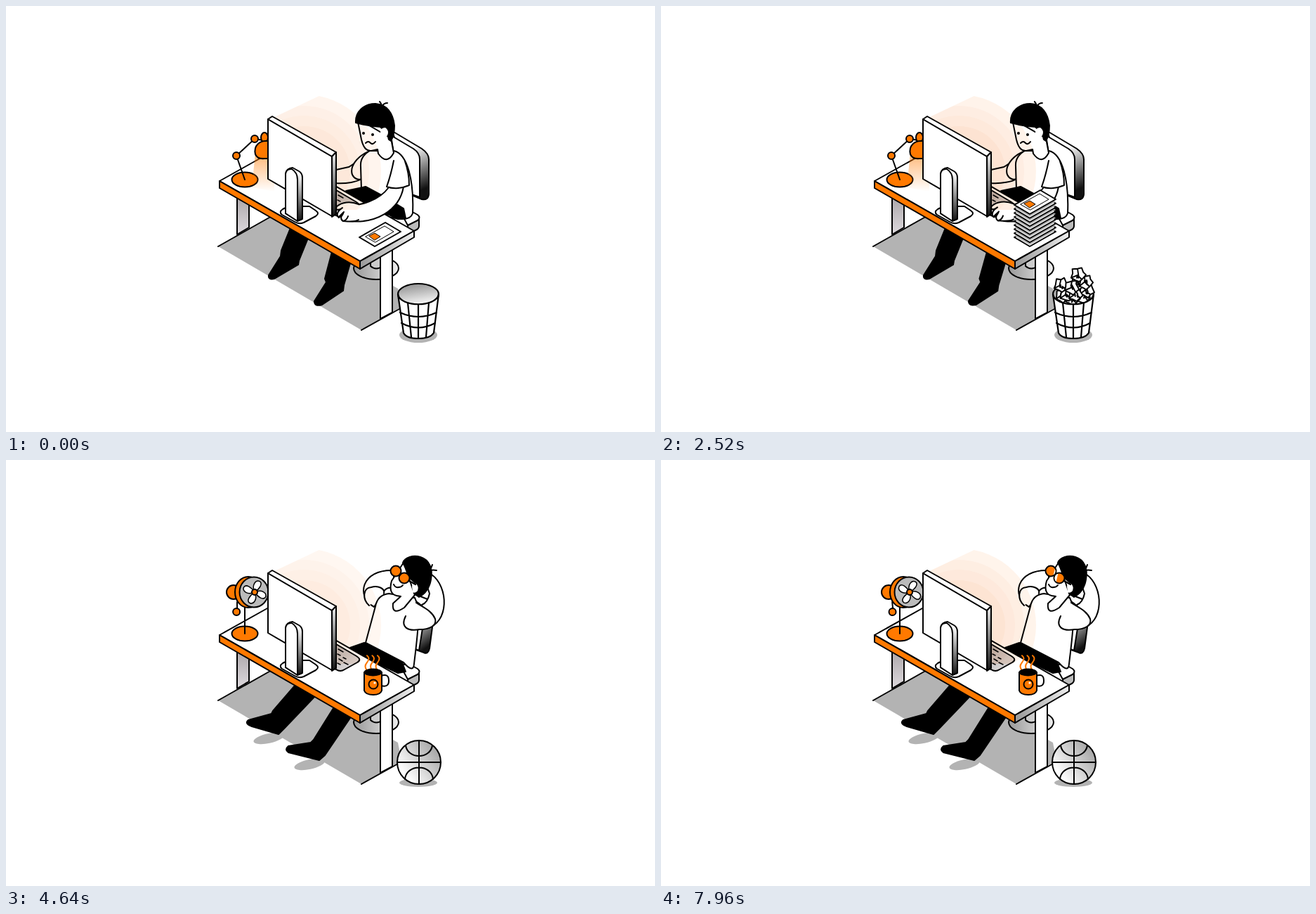
Recreate the animation shown at these times as an HTML page. Size 924 px wide and 606 px high, loop 8 s.

```html
<!DOCTYPE html>
<html lang="en">
<head>
<meta charset="utf-8">
<title>Desk</title>
<style>
  html, body { margin: 0; width: 100%; height: 100%; overflow: hidden; background: #fff; }
  svg { display: block; width: 100%; height: 100%; }
  .ink { stroke: #000; stroke-width: 2; stroke-linecap: round; stroke-linejoin: round; fill: #fff; }
  .line { fill: none; }
  .orange { fill: #ff7900; }
  .black { fill: #000; }
  .shade { fill: #b3b3b3; stroke: none; }
  .glow { mix-blend-mode: multiply; }
</style>
</head>
<body>
<svg viewBox="0 0 924 606" class="ink">
  <defs>
    <linearGradient id="down" x2="0" y2="1"><stop offset=".1" stop-color="#fff"/><stop offset="1" stop-color="#111"/></linearGradient>
    <linearGradient id="chair" x2=".25" y2="1"><stop offset=".35" stop-color="#fff"/><stop offset="1" stop-color="#111"/></linearGradient>
    <linearGradient id="side" x2="0" y2="1"><stop stop-color="#eee"/><stop offset=".35" stop-color="#999"/><stop offset="1" stop-color="#111"/></linearGradient>
    <linearGradient id="soft" x2="1" y2="0"><stop stop-color="#999"/><stop offset="1" stop-color="#eee"/></linearGradient>
    <linearGradient id="leg" x2="0" y2="1"><stop stop-color="#aaa5a8"/><stop offset="1" stop-color="#dedade"/></linearGradient>
    <linearGradient id="keys" x2="1" y2="1"><stop stop-color="#aaa"/><stop offset="1" stop-color="#e4dfdf"/></linearGradient>
    <linearGradient id="sphere" x1="1" y1=".1" x2=".15" y2=".75"><stop stop-color="#999"/><stop offset=".5" stop-color="#ccc"/><stop offset="1" stop-color="#fff"/></linearGradient>
    <linearGradient id="inside" x2=".3" y2="1"><stop stop-color="#888"/><stop offset="1" stop-color="#f2f2f2"/></linearGradient>
    <linearGradient id="beam" x2="0" y2="1"><stop stop-color="#ff7900" stop-opacity=".65"/><stop offset="1" stop-color="#ff7900" stop-opacity="0"/></linearGradient>
    <clipPath id="screenLight"><path d="M376 161L450 126H560V250L500 290H464L440 220Z"/></clipPath>
    <clipPath id="lenses"><circle cx="555" cy="158" r="6.6"/><circle cx="567" cy="168" r="6.6"/></clipPath>
  </defs>

  <path class="shade" d="M302 342L376 300L558 402L563 428L506 461Z"/>
  <g id="footShade" class="shade">
    <ellipse cx="374" cy="396" rx="22" ry="7" transform="rotate(-12 374 396)"/>
    <ellipse cx="432" cy="433" rx="22" ry="7" transform="rotate(-12 432 433)"/>
  </g>

  <ellipse cx="527" cy="373" rx="32" ry="16" fill="url(#soft)"/>
  <path d="M519 360V370Q527 377 536 370V358" fill="#ccc"/>
  <path d="M572 309L588 300V313Q588 317 583 319L572 324Z" fill="#bbb"/>
  <path d="M560 290L577 292L586 297Q591 301 586 305L572 312Z"/>
  <path id="chairSide" fill="url(#chair)"/>
  <path id="chairBack"/>

  <g id="farArm"><path id="farFore"/><path id="farSleeve"/></g>
  <path id="torso"/>
  <path id="thighs" class="black"/>
  <path id="leftLeg" class="black"/>
  <path id="rightLeg" class="black"/>

  <path d="M329 270V325L346 315V280Z" fill="url(#leg)"/>
  <path class="line" d="M302 342L380 298M506 461L560 431"/>
  <path d="M533 350V445L550 436V342Z"/>
  <path d="M304 249L381 206L581 320L504 363Z"/>
  <path class="orange" d="M304 249L504 363V374L304 259Z"/>
  <path d="M504 363L581 320V329L504 374Z" fill="url(#soft)"/>
  <path d="M460 256L499 279Q507 284 500 288L482 298Q476 302 470 298L450 287Z" fill="url(#keys)"/>
  <path class="line" d="M472 276L476 278M474 283L479 286M472 289L476 291M480 281L484 283M481 288L487 291M473 269L480 273" stroke-width="1.5"/>

  <ellipse class="orange" cx="340" cy="247" rx="18.5" ry="10.5"/>
  <g id="lamp">
    <path id="cone" d="M355 209L350 258L382 264V210Z" fill="url(#beam)" stroke="none"/>
    <path class="line" d="M340 247L328 213L354 189L366 191"/>
    <g class="orange">
      <circle cx="328" cy="213" r="5"/><circle cx="354" cy="189" r="5"/>
      <ellipse cx="368" cy="187" rx="5" ry="7"/>
      <path d="M355 211C352 198 362 191 372 192H382V217H368Q358 218 355 211Z"/>
    </g>
  </g>
  <g id="fan">
    <path class="line" d="M340 247V208"/>
    <g id="cord"><path class="line" d="M329 202V216"/><circle class="orange" cx="328" cy="216" r="5"/></g>
    <circle class="orange" cx="324" cy="188" r="10"/>
    <ellipse class="orange" cx="345" cy="188" rx="19" ry="22"/>
    <ellipse cx="353" cy="188" rx="20.5" ry="21.5" fill="#bbb"/>
    <g id="blades"></g>
    <circle class="orange" cx="354" cy="188" r="4"/>
  </g>

  <path id="nearFore"/>
  <path id="nearSleeve"/>
  <g id="head">
    <path id="face"/>
    <path id="hair" class="black"/>
    <path id="ear" stroke="none"/>
    <path id="tuft" class="line"/>
    <path id="eyes" class="line" stroke-width="4"/>
    <path id="mouth" class="line"/>
    <g id="glasses">
      <path class="line" d="M572 171L583 177" stroke-width="2.4"/>
      <circle class="orange" cx="555" cy="158" r="7.5"/><circle class="orange" cx="567" cy="168" r="7.5"/>
      <g clip-path="url(#lenses)"><path id="glint" d="M4 -20L-8 30" stroke="#fff" stroke-width="6"/></g>
    </g>
  </g>
  <g id="hand">
    <path d="M502 282C490 277 478 279 471 285C468 291 474 291 479 287C471 292 470 298 474 301C472 301 477 297 481 293C476 299 476 304 480 306C484 306 496 308 502 304"/>
    <path class="line" d="M474 300Q478 300 480 295M480 306Q485 305 487 299"/>
  </g>

  <g id="light" class="glow" clip-path="url(#screenLight)" stroke="none"></g>

  <path d="M394 289L402 285H432L441 291Q447 295 441 299L424 308Q417 311 411 307L393 297Q388 293 394 289Z"/>
  <path d="M373 161L464 214V299L373 246Z"/>
  <path d="M373 161L379 157L470 208L464 214Z"/>
  <path d="M464 214L470 208V296L464 300Z" fill="url(#side)"/>
  <path d="M398 295V239Q399 231 408 230L417 235Q422 238 422 244V303L415 306Z" fill="url(#down)"/>
  <path d="M398 295V239Q399 231 407 232Q415 237 415 247V306Z"/>

  <g id="stack"></g>
  <g id="mug">
    <path class="line" id="steam" style="stroke:#ff7900"/>
    <path d="M534 307Q545 303 545 314Q545 324 534 321Z"/>
    <path class="orange" d="M510 302V328Q512 334 523 334Q533 334 535 328V302Z"/>
    <ellipse class="black" cx="522.5" cy="302" rx="12" ry="4.5"/>
    <circle class="orange" cx="523" cy="319" r="6.5"/><circle cx="525" cy="317" r="1.6" stroke="none"/>
  </g>

  <g id="bin" stroke-width="2.2">
    <ellipse id="binShade" class="shade" cx="587" cy="468" rx="27" ry="11"/>
    <ellipse cx="587" cy="410" rx="29" ry="15" fill="url(#inside)"/>
    <g id="balls" stroke-width="1.9"></g>
    <path d="M558 410L566 465Q570 473 587 473Q604 473 609 465L616 410C613 429 561 429 558 410Z"/>
    <path class="line" d="M572 422L577 471M587 425V473M602 422L598 471M561 436Q587 448 613 436M563 451Q587 464 611 451"/>
  </g>
  <g id="ball">
    <ellipse class="shade" cx="587" cy="459" rx="27" ry="6"/>
    <circle cx="588" cy="430" r="31" fill="url(#sphere)"/>
    <path class="line" d="M588 399V461M557 430H619M569 406C572 426 604 426 607 406M568 454C570 432 606 432 608 454"/>
  </g>
</svg>
<script>
const NS = 'http://www.w3.org/2000/svg';
const $ = id => document.getElementById(id);
const add = (parent, tag, attrs) => {
  const node = parent.appendChild(document.createElementNS(NS, tag));
  for (const k in attrs) node.setAttribute(k, attrs[k]);
  return node;
};
const move = (el, value) => el.setAttribute('transform', value);
const clamp = v => Math.max(0, Math.min(1, v));
const span = (t, a, b) => clamp((t - a) / (b - a));
const ease = k => k * k * (3 - 2 * k);
const back = k => k <= 0 ? 0 : 1 + 2.4 * (k - 1) ** 3 + 1.4 * (k - 1) ** 2;
const lerp = (a, b, k) => a + (b - a) * k;
const wave = (t, period) => Math.sin(t / period * 2 * Math.PI);

// Path poses: typing, hands on face, relaxed (the last defaults to the second).
const poses = {
  chairSide: ['M550 178L592 203Q602 210 602 218L602 268Q601 277 592 275L580 270Z',
    'M580 190L600 198Q612 204 610 215L603 268Q601 277 595 274L584 270Z'],
  chairBack: ['M548 184L580 203Q589 209 589 218L589 272L560 262Z',
    'M575 195L588 204Q597 211 596 221L588 271L565 262Z'],
  farFore: ['M514 214C502 218 494 226 488 229L470 233L470 252C485 253 500 250 506 246Z',
    'M520 215C490 201 494 157 546 160L546 180L542 184C534 182 530 192 525 204Z',
    'M524 209C498 195 505 155 552 157L552 176L549 182C540 180 535 190 530 200Z'],
  farSleeve: ['M516 207C500 214 489 228 493 240C496 246 502 248 506 246',
    'M511 211C501 201 504 187 515 184C525 182 534 185 534 191',
    'M517 207C507 198 508 182 520 181C530 178 540 183 538 190'],
  torso: ['M518 206Q504 214 505 228L506 262L545 300Q575 308 579 295C581 250 572 210 552 206Z',
    'M541 190Q526 192 523 208L511 260L566 288Q580 304 581 290C584 262 588 215 574 196Z',
    'M545 190Q529 192 526 208L512 260L566 288Q580 304 581 290C584 262 592 215 582 196Z'],
  thighs: ['M484 263L512 257L540 272L566 288L569 302L558 303L520 285Z',
    'M490 267L510 260L540 275L564 288L569 301L558 303L520 285Z'],
  leftLeg: ['M405 316L392 348L391 356L374 383Q373 390 382 388L416 368L417 362L430 330Z',
    'M412 320L381 358L378 363L348 372Q342 378 352 380L390 388L399 380L440 336Z',
    'M412 320L380 357L378 361L345 370Q339 375 350 379L388 390L396 382L440 336Z'],
  rightLeg: ['M464 350L454 388L456 393L439 420Q439 428 450 425L480 405L481 397L490 366Z',
    'M468 350L441 399L436 403L405 411Q400 417 408 420L448 425L458 417L492 364Z',
    'M468 350L438 398L434 402L402 407Q396 412 402 416L446 427L454 420L492 364Z'],
  nearFore: ['M545 258C530 278 505 283 490 284L476 290L488 306C525 310 560 292 566 257Z',
    'M590 230C582 222 574 210 562 204L556 188L572 180C590 190 632 220 600 239Z',
    'M592 206C600 203 602 195 603 190L598 175L606 163C630 180 632 232 598 240Z'],
  nearSleeve: ['M552 220C549 235 546 246 542 257C552 261 565 259 574 255C574 245 572 232 568 221',
    'M568 222C560 240 575 246 590 243C604 241 614 236 611 226C606 216 595 211 584 204',
    'M569 222C561 238 572 244 589 241C602 241 614 236 611 226C606 214 594 210 584 203'],
  face: ['M500 160L506 190Q510 207 520 206L529 204L530 210Q542 227 552 209L548 188Z',
    'M566 146L549 172Q544 190 556 193L562 194L551 204Q549 222 567 210L582 192Z'],
  hair: ['M498 166C497 150 510 139 526 139C542 140 551 152 553 170C553 180 551 187 548 192L545 190L543 182L533 172C520 171 508 169 498 166Z',
    'M565 146C568 138 580 135 590 138C603 142 608 155 605 170C603 182 597 190 588 195L581 190L586 178L576 169C573 160 568 152 565 146Z'],
  ear: ['M533 180Q533 173 540 173Q546 177 543 184Q540 189 535 186',
    'M578 180Q579 174 584 176Q588 180 586 186Q583 190 579 188'],
  tuft: ['M535 142Q534 138 532 136M536 142Q538 138 543 138',
    'M603 157Q606 153 607 149M604 157Q608 156 613 157'],
  eyes: ['M509 181L509 181M522 183L522 183', 'M558 164L558 164M569 171L569 171'],
  mouth: ['M512 195Q516 191 519 195Q522 198 526 193', 'M552 177Q554 182 559 181Q563 181 565 178']
};
const mix = (a, b, k) => {
  const target = b.match(/-?[\d.]+/g);
  let i = 0;
  return a.replace(/-?[\d.]+/g, n => lerp(+n, +target[i++], k).toFixed(2));
};

let seed = 11;
const random = () => (seed = seed * 16807 % 2147483647) / 2147483647;

for (const [rx, ry, fill] of [[110, 109, '#fff2e8'], [93, 93, '#feebde'], [80, 79, '#fee6d6'], [66, 64, '#fde0cc']])
  add($('light'), 'ellipse', { cx: 424, cy: 235, rx, ry, fill });

for (let i = 0; i < 4; i++)
  add($('blades'), 'path', { d: 'M0 0C-8 -8 -5 -17 1 -17C7 -16 5 -7 0 0Z', transform: `rotate(${i * 90})`, 'stroke-width': 1.5 });

const sheets = Array.from({ length: 12 }, (_, i) => {
  const sheet = add($('stack'), 'g', { transform: `translate(0 ${-5.75 * i})` });
  const outline = 'M503 329L540 308L562 321L525 342Z';
  if (i) add(sheet, 'path', { d: outline, class: 'shade', transform: 'translate(0 3.5)' });
  add(sheet, 'path', { d: outline });
  add(sheet, 'path', { d: 'M512 328L539 313L552 321L526 336Z', 'stroke-width': 1 });
  add(sheet, 'path', { d: 'M517 327L525 323L533 328L525 333Z', class: 'orange', 'stroke-width': 1 });
  return sheet;
});

const spots = [[572, 412], [601, 413], [586, 416], [606, 404], [578, 410], [590, 410],
  [594, 394], [570, 397], [585, 400], [605, 393], [594, 382], [580, 374]];
const balls = spots.map(([x, y]) => {
  const ring = Array.from({ length: 10 }, (_, i) => {
    const a = (i + random() * .5) / 10 * 2 * Math.PI, r = (i % 2 ? 7.5 : 10) + random() * 1.5;
    return [x + r * Math.cos(a), y + r * Math.sin(a)].map(v => v.toFixed(1)).join(' ');
  });
  const creases = [1, 4, 7].map(i => `M${ring[i]}L${x + random() * 6 - 3} ${y + random() * 6 - 3}l${random() * 5 - 2} 3`);
  return add($('balls'), 'path', { d: `M${ring.join('L')}Z${creases.join('')}` });
});

function pop(id, k, x, y) {
  $(id).style.display = k > 0 ? '' : 'none';
  move($(id), `translate(${x} ${y}) scale(${k}) translate(${-x} ${-y})`);
}

function drawMan(t) {
  const lean = ease(span(t, 2560, 3100)), relax = ease(span(t, 3170, 3370));
  for (const id in poses) {
    const [a, b, c = b] = poses[id];
    $(id).setAttribute('d', relax ? mix(b, c, relax) : mix(a, b, lean));
  }
  const shift = lean - relax, busy = 1 - lean;
  move($('head'), `translate(${-9 * shift} ${-shift}) rotate(${-.7 * busy * (1 - Math.cos(t / 880 * 2 * Math.PI)) / 2} 540 205)`);
  move($('rightLeg'), `rotate(${busy * .8 * wave(t, 480)} 470 350)`);
  move($('farArm'), `translate(0 ${busy * .8 * wave(t, 240)})`);

  const hand = $('hand');
  hand.style.display = relax > .5 ? 'none' : '';
  move(hand, `translate(${78 * lean + 34 * relax} ${-103 * lean - 15 * relax + busy * wave(t, 200)}) rotate(${35 * lean} 485 293)`);
  if (lean > .5 && relax < .5) $('head').after($('nearFore'));
  else $('nearSleeve').before($('nearFore'));

  const worn = span(t, 3400, 3520);
  $('glasses').style.opacity = worn;
  $('eyes').style.opacity = 1 - worn;
  const sweep = (t + 2280) % 2500;
  $('glint').style.display = sweep < 420 ? '' : 'none';
  move($('glint'), `translate(${543 + sweep / 11.5} 158)`);
  $('footShade').style.opacity = span(t, 3300, 3500);
}

function drawProps(t) {
  sheets.forEach((s, i) => s.style.opacity = i ? span(t, i * 284, i * 284 + 80) : 1);
  balls.forEach((b, i) => b.style.opacity = span(t, 60 + i * 235, 160 + i * 235));
  const fade = span(t, 2950, 3160);
  $('binShade').setAttribute('rx', lerp(27, 23, fade));
  $('binShade').setAttribute('ry', lerp(11, 7, fade));

  const leave = (a, b) => 1 - ease(span(t, a, b)), enter = (a, b) => back(span(t, a, b));
  pop('stack', leave(3280, 3480), 532, 335);
  pop('bin', leave(3280, 3480), 587, 468);
  pop('lamp', leave(3400, 3560), 340, 247);
  pop('mug', enter(3480, 3850), 522, 333);
  pop('ball', enter(3480, 3850), 588, 461);
  pop('fan', enter(3560, 3950), 340, 247);

  $('cone').style.opacity = .85 + .15 * wave(t, 1000);
  $('light').style.opacity = .75 - .2 * Math.cos((t - 1000) / 4200 * 2 * Math.PI);
  move($('blades'), `translate(354 188) rotate(${t * .625})`);
  move($('cord'), `rotate(${-3 + 3 * wave(t, 900)} 329 200)`);

  const bend = 2 + 2 * Math.cos((t - 4640) / 1107 * 2 * Math.PI), top = 275 + bend * .8;
  $('steam').setAttribute('d', [514, 521.5, 529].map(x =>
    `M${x} 299Q${x - 1 - bend} 294 ${x} 288T${x} ${top}`).join(''));
}

function frame() {
  const t = performance.now() % 8000;
  drawMan(t);
  drawProps(t);
  requestAnimationFrame(frame);
}
frame();
</script>
</body>
</html>
```
